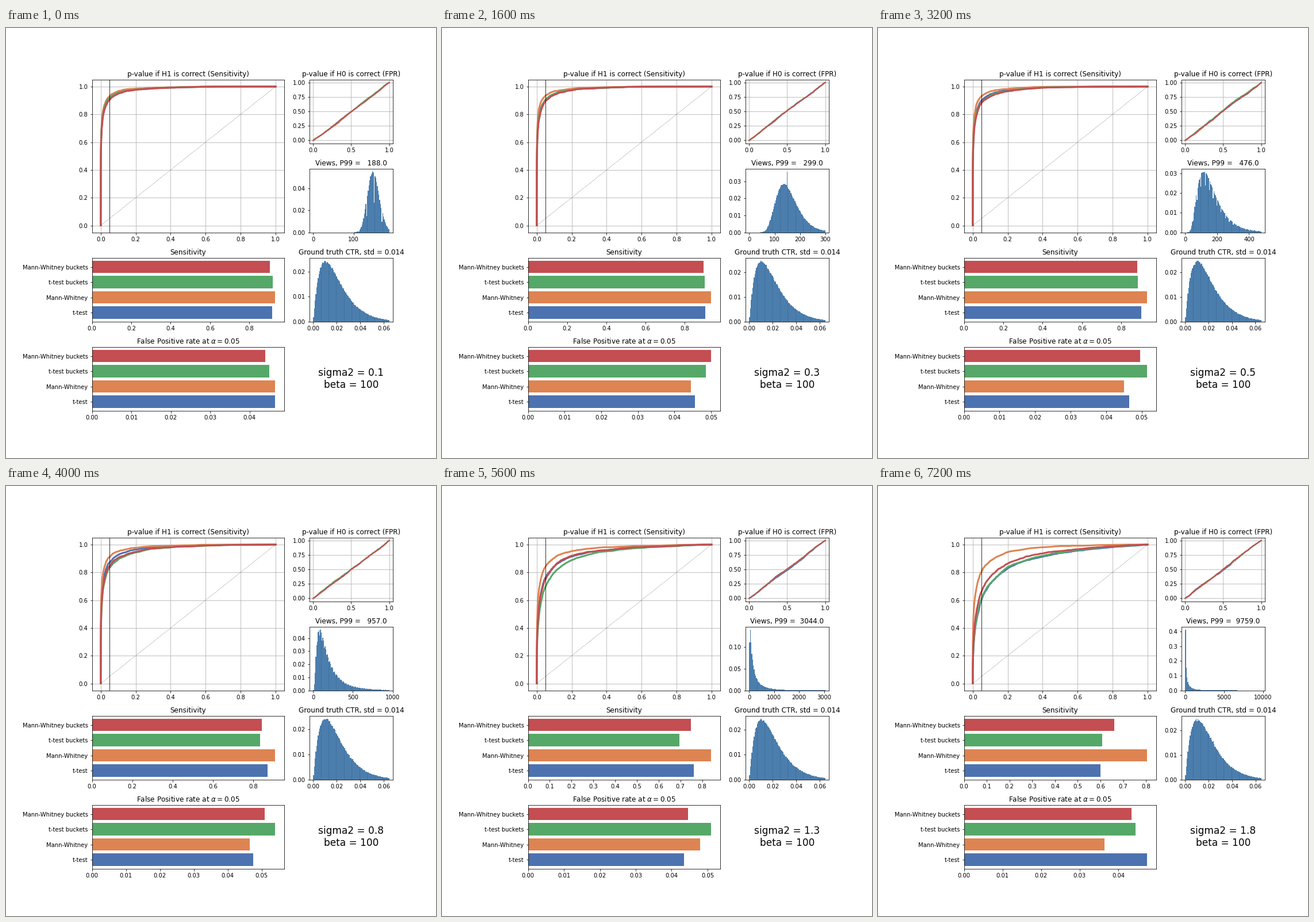
A matplotlib script for the animation above (8000 ms loop, 748 by 748 pixels).

```python
import math

import matplotlib.pyplot as plt
import numpy as np
from matplotlib.animation import FuncAnimation

COLORS = ["#4c72b0", "#dd8452", "#55a868", "#c44e52"]
TESTS = ["t-test", "Mann-Whitney", "t-test buckets", "Mann-Whitney buckets"]
HIST_COLOR, SEAM_COLOR = "#4b7ead", "#3f6d99"
RUNS = 2000
SAMPLES = 500_000
BETA = 100
ALPHA = 2 * BETA / 98  # gives a mean click rate of 2 %

# sigma, 99th percentile of views, sensitivity per test, false positive rate per test
STEPS = [
    (0.1, 188, (.9160, .9310, .9190, .9045), (.0465, .0465, .0450, .0440)),
    (0.2, 237, (.8980, .9340, .9025, .8925), (.0460, .0460, .0480, .0520)),
    (0.3, 299, (.9060, .9350, .9025, .8960), (.0455, .0445, .0485, .0500)),
    (0.4, 377, (.9100, .9355, .9025, .8985), (.0445, .0425, .0490, .0475)),
    (0.5, 476, (.9000, .9310, .8850, .8810), (.0465, .0450, .0515, .0495)),
    (0.8, 957, (.8700, .9090, .8330, .8435), (.0475, .0465, .0540, .0510)),
    (1.0, 1522, (.8290, .8825, .7920, .8030), (.0475, .0490, .0515, .0555)),
    (1.3, 3044, (.7615, .8410, .6955, .7485), (.0435, .0480, .0510, .0445)),
    (1.5, 4870, (.7000, .8280, .6600, .7120), (.0455, .0430, .0480, .0440)),
    (1.8, 9759, (.6010, .8050, .6085, .6605), (.0475, .0365, .0445, .0435)),
]


@np.vectorize
def phi(z):
    return 0.5 * math.erfc(-z / math.sqrt(2))


Z = np.linspace(6, 0, 1500)
P_VALUES = 2 * phi(-Z)
Z_GRID = np.linspace(-4, 4, 801)
PHI_GRID = phi(Z_GRID)


def effect_size(power):
    """Shift of a two-sided z-test that has the given power at 5 %."""
    return 1.96 + np.interp(power, PHI_GRID, Z_GRID)


def p_value_cdf(shift, at_five_percent, noise):
    """Empirical CDF of p-values that passes through the given rate at 5 %."""
    power = phi(shift - Z) + phi(-shift - Z)
    steps = np.diff(power, prepend=0).clip(0)
    walk = np.cumsum(noise * np.sqrt(steps / RUNS))
    middle = np.interp(0.05, P_VALUES, power)
    drift = at_five_percent - middle
    knots = [0, middle, 1]
    walk -= np.interp(power, knots, [0, np.interp(middle, power, walk) - drift, walk[-1]])
    cdf = np.maximum.accumulate((power + walk).clip(0, 1))
    return np.append(0, P_VALUES), np.append(0, cdf)


def draw_curves(ax, shifts, rates, rng, width):
    common = rng.normal(size=Z.size)
    for shift, rate, color in zip(shifts, rates, COLORS):
        noise = (common + rng.normal(size=Z.size)) / math.sqrt(2)
        ax.plot(*p_value_cdf(shift, rate, noise), color=color, lw=width)
    ax.grid(True)


def draw_bars(ax, values, title):
    ax.barh(TESTS, values, color=COLORS)
    ax.set_title(title)


def draw_hist(ax, values, top, title):
    edges = np.linspace(0, top, 100)
    counts = np.histogram(values, edges)[0]
    share = counts / counts.sum()
    ax.bar(edges[:-1], share, np.diff(edges), align="edge", color=HIST_COLOR, lw=0)
    ax.vlines(edges[10:-1:10], 0, share[10::10], color=SEAM_COLOR, lw=0.8)
    ax.set_title(title)


fig = plt.figure(figsize=(748 / 72, 748 / 72), dpi=72, facecolor="white")
grid = fig.add_gridspec(4, 3, left=0.2, right=0.9, bottom=0.11, top=0.88,
                        wspace=0.3, hspace=0.4)
roc_ax = fig.add_subplot(grid[:2, :2])
sens_ax = fig.add_subplot(grid[2, :2])
fpr_ax = fig.add_subplot(grid[3, :2])
null_ax = fig.add_subplot(grid[0, 2])
views_ax = fig.add_subplot(grid[1, 2])
ctr_ax = fig.add_subplot(grid[2, 2])
note_ax = fig.add_subplot(grid[3, 2])


def update(i):
    sigma, p99, sensitivity, false_positive = STEPS[i]
    rng = np.random.default_rng(100 + i)
    for ax in fig.axes:
        ax.clear()

    draw_curves(roc_ax, [effect_size(s) for s in sensitivity], sensitivity, rng, 3)
    roc_ax.axvline(0.05, color="black", lw=0.8)
    roc_ax.plot([0, 1], [0, 1], color="black", ls=":", lw=0.5)
    roc_ax.set_title("p-value if H1 is correct (Sensitivity)")

    draw_curves(null_ax, [0] * 4, false_positive, rng, 2)
    null_ax.set_title("p-value if H0 is correct (FPR)")

    draw_bars(sens_ax, sensitivity, "Sensitivity")
    draw_bars(fpr_ax, false_positive, r"False Positive rate at $\alpha=0.05$")

    views = rng.lognormal(5, sigma, SAMPLES).astype(int) + 1
    draw_hist(views_ax, views, p99, f"Views, P99 = {p99:7.1f}")

    ctr = rng.beta(ALPHA, BETA, SAMPLES)
    draw_hist(ctr_ax, ctr, np.quantile(ctr, 0.99),
              f"Ground truth CTR, std = {ctr.std():.3f}")

    note_ax.axis("off")
    note_ax.text(0.5, 0.5, f"sigma2 = {sigma:.1f}\nbeta = {BETA}", fontsize=17,
                 ha="center", va="center")
    return []


anim = FuncAnimation(fig, update, frames=len(STEPS), interval=800,
                     init_func=lambda: [], repeat=True, repeat_delay=0, blit=False)
plt.show()
```
